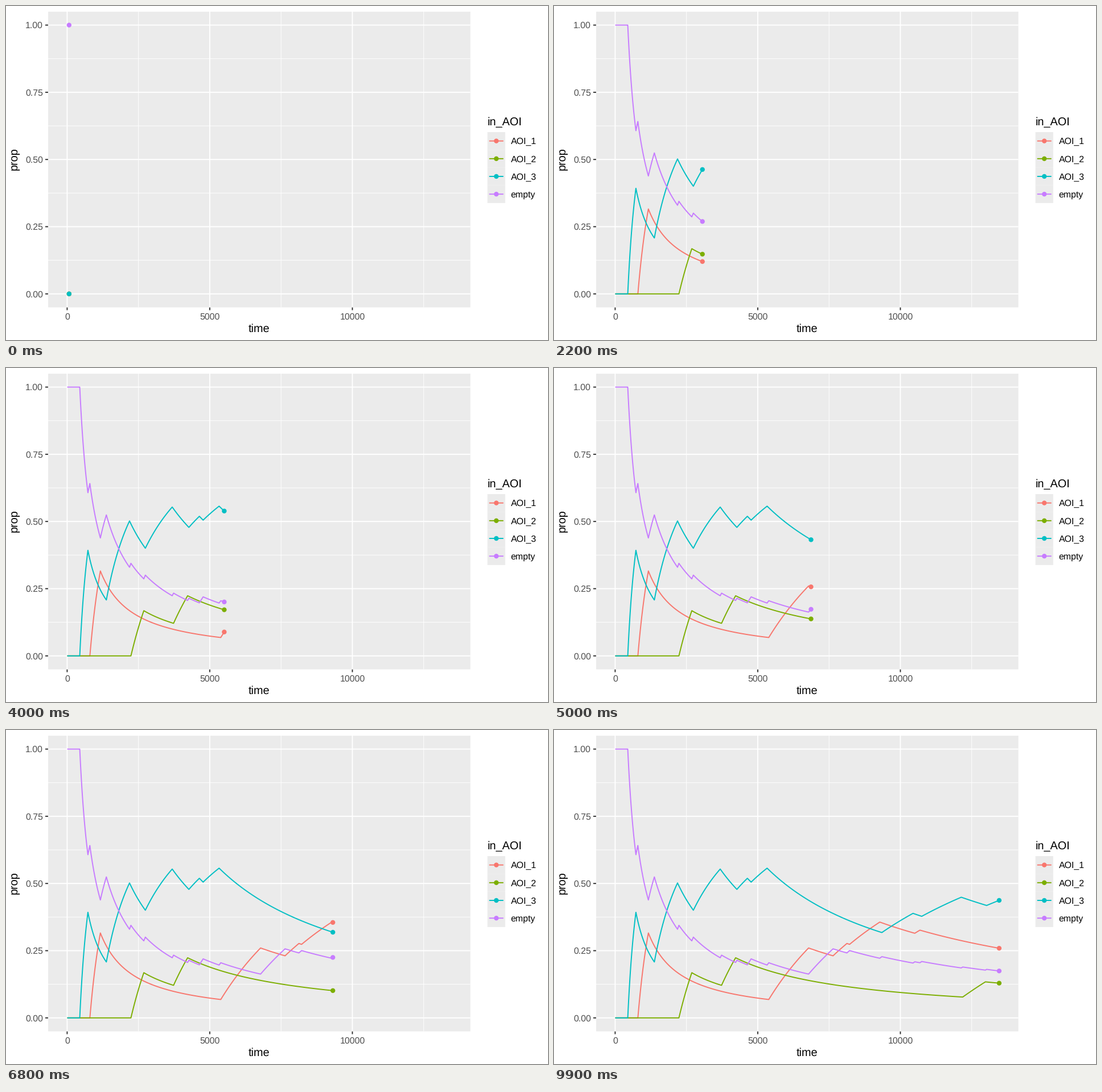
Animation of 952 by 588 pixels, one loop 10000 ms. Source, as a matplotlib script:

```python
import numpy as np
import matplotlib.pyplot as plt
from matplotlib.animation import FuncAnimation
from matplotlib.patches import Circle, Rectangle

W, H, DPI = 952, 588, 100
PT = 72 / DPI  # points per pixel
FRAMES, INTERVAL = 100, 100

plt.rcParams.update({
    "font.family": "Liberation Sans",
    "text.hinting": "none",
    "text.kerning_factor": 6,  # plain advance widths
    "path.snap": False,
    "path.simplify": False,
    "toolbar": "None",
})

X0, Y0, X1, Y1 = 74.0, 10.0, 815.6, 530.5  # panel
GREY, TICK, LABEL = "#EBEBEB", "#333333", "#4D4D4D"
LINE, RADIUS = 1.93, 4.17
SMALL, BIG = 15.9, 19.86
COLORS = {"AOI_1": "#F8766D", "AOI_2": "#7CAE00",
          "AOI_3": "#00BFC4", "empty": "#C77CFF"}

# Start and end of each gaze visit, ms; the rest of the time is "empty"
VISITS = {
    "AOI_1": [(797, 1165), (5386, 6782), (7640, 8125), (8220, 9278),
              (10505, 10686)],
    "AOI_2": [(2236, 2688), (3731, 4224), (12186, 12980)],
    "AOI_3": [(442, 728), (1375, 2187), (2742, 3684), (4268, 4636),
              (4768, 5328), (9350, 10443), (10749, 12135), (13024, 13463)],
}
KINKS = np.ravel(sum(VISITS.values(), []))
T_MAX = KINKS.max()
STEP = T_MAX / (FRAMES - 1)
TIMES = np.union1d(np.arange(4, T_MAX, 12), KINKS)


def px(t):
    return 107.4 + 0.0501 * t


def py(p):
    return 506.8 - 473.2 * p


def prop(name, t):
    """Share of the time up to t that was spent in one area."""
    if name == "empty":
        return 1 - sum(prop(area, t) for area in VISITS)
    return sum(np.clip(t, a, b) - a for a, b in VISITS[name]) / t


fig = plt.figure(figsize=(W / DPI, H / DPI), dpi=DPI, facecolor="white")
ax = fig.add_axes([0, 0, 1, 1])
ax.set_xlim(0, W)
ax.set_ylim(H, 0)
ax.axis("off")


def line(xs, ys, color, width=LINE, z=2):
    return ax.plot(xs, ys, color=color, lw=width * PT, zorder=z,
                   solid_capstyle="butt", solid_joinstyle="round")[0]


def dot(x, y, color):
    return ax.add_patch(Circle((x, y), RADIUS, fc=color, lw=0, zorder=6))


def rect(x, y, w, h):
    ax.add_patch(Rectangle((x, y), w, h, fc=GREY, lw=0, zorder=1))


def text(x, y, s, size, color="black", ha="left", **kw):
    ax.text(x, y, s, fontsize=size * PT, color=color, ha=ha,
            va="baseline", **kw)


def draw_panel():
    rect(X0, Y0, X1 - X0, Y1 - Y0)
    for p in np.arange(0.125, 1, 0.25):
        line([X0, X1], [py(p)] * 2, "white", LINE / 2)
    for t in np.arange(2500, T_MAX, 5000):
        line([px(t)] * 2, [Y0, Y1], "white", LINE / 2)
    for p in np.linspace(0, 1, 5):
        y = py(p)
        line([X0, X1], [y, y], "white", z=3)
        line([X0 - 5, X0], [y, y], TICK)
        text(65, y + 5.7, f"{p:.2f}", SMALL, LABEL, "right")
    for t in range(0, T_MAX, 5000):
        x = px(t)
        line([x, x], [Y0, Y1], "white", z=3)
        line([x, x], [Y1, Y1 + 5], TICK)
        text(x, 551.6, str(t), SMALL, LABEL, "center")
    text((X0 + X1) / 2, 574, "time", BIG, ha="center")
    text(19.6, 269.5, "prop", BIG, ha="center", rotation=90,
         rotation_mode="anchor")


def draw_legend():
    x, key = 845.6, 31.2
    text(x, 210.3, "in_AOI", BIG)
    for i, (name, color) in enumerate(COLORS.items()):
        top = 222 + i * key
        mid = top + key / 2
        rect(x, top, key, key)
        line([x + 0.1 * key, x + 0.9 * key], [mid, mid], color, z=4)
        dot(x + key / 2, mid, color)
        text(886.7, mid + 5.7, name, SMALL)


draw_panel()
draw_legend()
paths = [line([], [], c, z=5) for c in COLORS.values()]
heads = [dot(0, 0, c) for c in COLORS.values()]


def update(i):
    now = min((i + 0.5) * STEP, T_MAX)
    t = np.append(TIMES[TIMES < now], now)
    for name, path, head in zip(COLORS, paths, heads):
        x, y = px(t), py(prop(name, t))
        path.set_data(x, y)
        head.set_center((x[-1], y[-1]))
    return paths + heads


anim = FuncAnimation(fig, update, frames=FRAMES, interval=INTERVAL,
                     init_func=lambda: update(0), repeat=True,
                     repeat_delay=0, blit=False)
plt.show()
```
